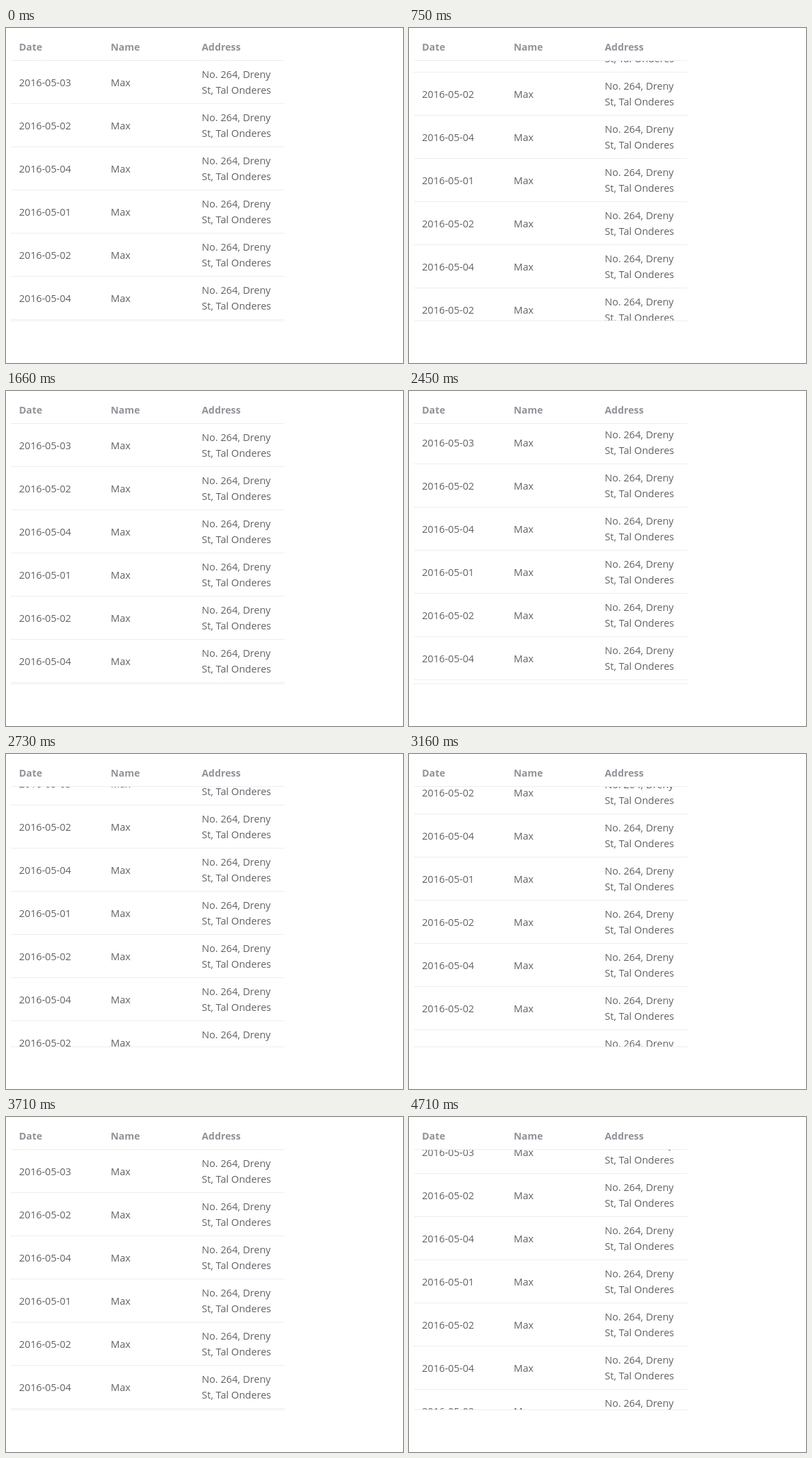
Write an HTML page that moves like this. It is 580 by 489 pixels and loops after 4780 ms.

```html
<!DOCTYPE html>
<html lang="en">
<head>
<meta charset="utf-8">
<title>Auto-scrolling table</title>
<style>
  html, body { margin: 0; width: 100%; height: 100%; overflow: hidden; background: #fff; }
  .table {
    position: absolute; left: 7px; top: 8px; width: 400px; height: 420px;
    overflow: hidden;
    font: 14.6px/23px "Open Sans", "Noto Sans", sans-serif;
    color: #606266;
  }
  .table::after {
    content: ""; position: absolute; left: 0; bottom: 0;
    width: 100%; height: 1px; background: #ebeef5;
  }
  .row {
    display: grid; grid-template-columns: 134px 133px 133px; align-items: center;
    box-sizing: border-box; height: 63px;
    border-bottom: 1px solid #ebeef5;
  }
  .row > div { padding: 0 12px; white-space: nowrap; }
  .head { height: 40px; font-size: 14.3px; font-weight: 700; color: #909399; }
  .body { height: 380px; overflow: hidden; }
</style>
</head>
<body>
<div class="table">
  <div class="row head"><div>Date</div><div>Name</div><div>Address</div></div>
  <div class="body" id="body"></div>
</div>
<script>
  const LOOP = 4780, FIRST = 400, CYCLE = 2050, STEP = 70;
  const TICK = 17, LEAD = 42, MAX = 124;
  const BOTTOM = MAX / 2 * TICK + TICK, RETURN = 186;

  const body = document.getElementById('body');
  body.innerHTML = [3, 2, 4, 1, 2, 4, 2, 4].map(day =>
    `<div class="row"><div>2016-05-0${day}</div><div>Max</div>` +
    `<div>No. 264, Dreny<br>St, Tal Onderes</div></div>`).join('');

  const ease = x => x * x * (3 - 2 * x);

  // Two pixels per tick down to the end, then an eased return to the top.
  function scrollAt(t) {
    if (t < FIRST) return 0;
    const step = Math.floor((t - FIRST) % CYCLE / STEP);
    const p = step * STEP + LEAD;
    if (p < BOTTOM) return Math.min(MAX, 2 * Math.floor(p / TICK));
    const back = Math.min(1, (p - BOTTOM) / RETURN);
    return Math.round(MAX * (1 - ease(back)));
  }

  const start = performance.now();
  function draw() {
    body.scrollTop = scrollAt((performance.now() - start) % LOOP);
    requestAnimationFrame(draw);
  }
  draw();
</script>
</body>
</html>
```
